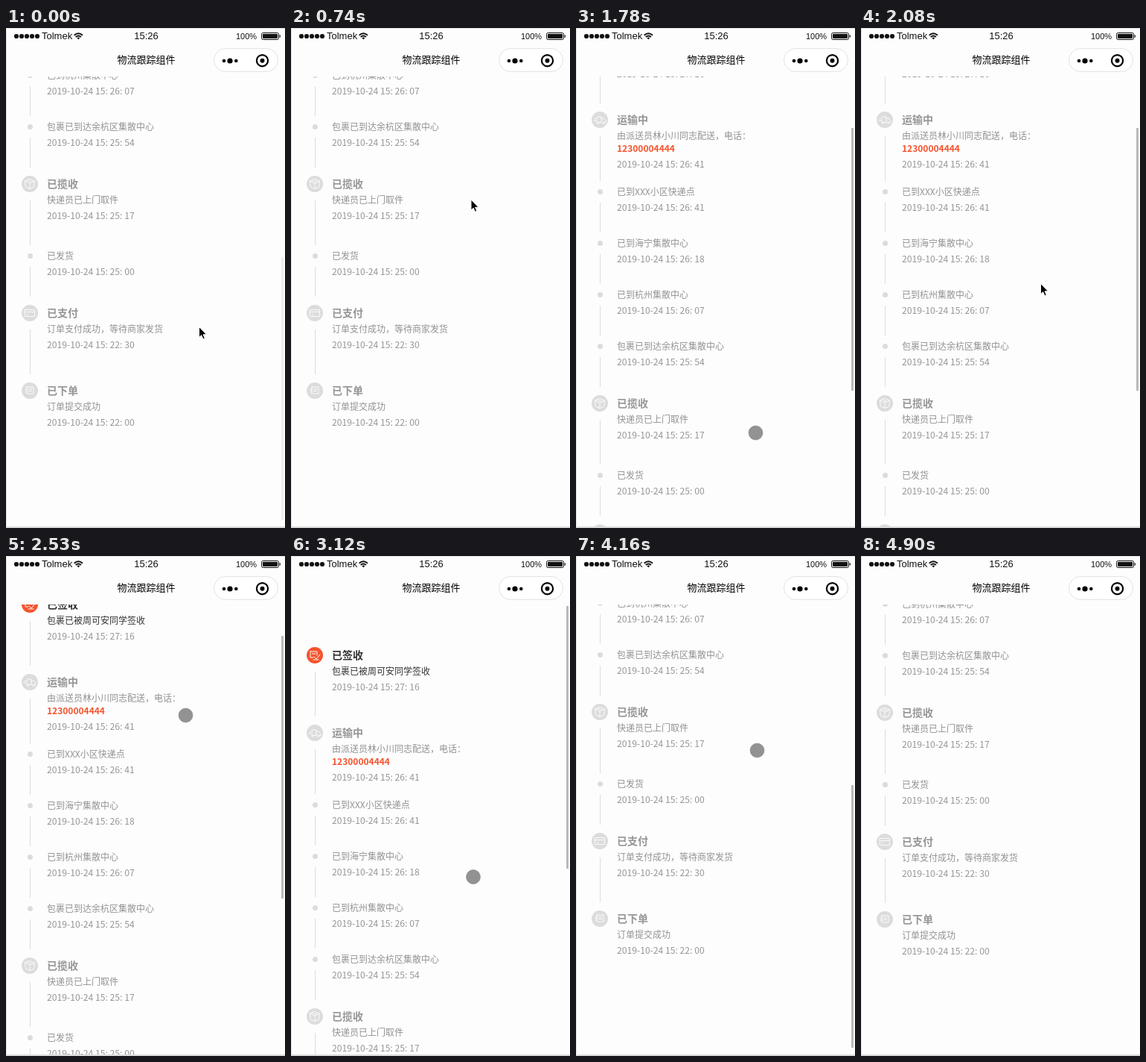
An HTML page for the animation above (5.5 s loop, 375 by 670 pixels).

```html
<!DOCTYPE html>
<html lang="zh-CN">
<head>
<meta charset="utf-8">
<style>
  html, body { margin: 0; width: 100%; height: 100%; overflow: hidden; background: #fdfdfd; }
  svg { display: block; width: 375px; height: 670px; }
  text { font: 12px "Noto Sans CJK SC", "Noto Sans CJK", sans-serif; fill: #929292; white-space: pre; }
  .time { font-size: 12.15px; fill: #969696; }
  .title { font-size: 14px; font-weight: 700; fill: #969696; }
  .done { fill: #333; }
  .phone { font-weight: 700; fill: #f5532d; }
  .status { font: 13px "Liberation Sans", Arial, sans-serif; fill: #111; }
  .small { font-size: 11px; }
  .head { font-size: 13px; font-weight: 500; fill: #000; }
  .icon { fill: none; stroke: #fbfbfb; stroke-width: 1; stroke-linejoin: round; stroke-linecap: round; }
</style>
</head>
<body>
<svg viewBox="0 0 375 670">
  <defs><clipPath id="page"><rect y="65" width="375" height="603"/></clipPath></defs>
  <rect width="375" height="670" fill="#fdfdfd"/>
  <g clip-path="url(#page)"><g id="list"></g></g>

  <g id="dots" fill="#111"></g>
  <text class="status" x="48" y="15">Tolmek</text>
  <g fill="none" stroke="#111" stroke-width="1.8">
    <path d="M91.6 9.8Q97.3 4.800 103 9.800M93.700 12Q97.300 8.900 100.900 12"/>
    <path d="M95.300 13.200Q97.300 11.700 99.300 13.200L97.300 15.500Z" fill="#111" stroke="none"/>
  </g>
  <text class="status" x="188.5" y="15" text-anchor="middle">15:26</text>
  <text class="status small" x="309" y="15">100%</text>
  <rect x="343.500" y="6.500" width="23" height="9" rx="2" fill="none" stroke="#111"/>
  <rect x="345" y="8" width="20" height="6" rx=".8" fill="#111"/>
  <path d="M368 9.300Q369.500 11 368 12.700Z" fill="#111" stroke="#111" stroke-width=".6"/>

  <text class="head" x="188.500" y="47" text-anchor="middle">物流跟踪组件</text>
  <rect x="279.500" y="27.500" width="86" height="31" rx="15.500" fill="#fff" stroke="#e3e3e3"/>
  <circle cx="293" cy="44" r="2.300"/><circle cx="301" cy="44" r="3.600"/><circle cx="309.300" cy="44" r="2.300"/>
  <circle cx="344.500" cy="43.700" r="7.600" fill="none" stroke="#000" stroke-width="2.200"/>
  <circle cx="344.500" cy="43.700" r="3"/>

  <path d="M.5 670V.5H375" fill="none" stroke="#e2e2e2"/>
  <path d="M0 669H375" stroke="#d8d8d8" stroke-width="2"/>
  <rect id="bar" x="370" width="3" height="352"/>
  <circle id="touch" r="9.500" fill="#929292" stroke="#878787" stroke-width=".6"/>
  <path id="arrow" d="M0 0V14.200L3.200 11.200L5.400 16.300L7.800 15.300L5.600 10.300H10Z" fill="#000" stroke="#fff" stroke-width="1"/>
</svg>
<script>
const LOOP = 5500, STEP = 148.5, LAST = 33;
const $ = id => document.getElementById(id);

const icons = {
  order: 'M-4 -5H5V4H-2.500Q-5 4 -5 1.500V-3M-4 -5V2.500M-1.500 -2H2.500M-1.500 .5H2.500',
  card: 'M-6.500 -4.500H6.500V4.500H-6.500ZM-6.500 -1.500H6.500M-4 2H-2',
  box: 'M0 -6.500L6.500 -3.800L5.700 4L0 6.500L-5.700 4L-6.500 -3.800ZM-6.500 -3.800L0 -1L6.500 -3.800M0 -1V6.500M-3.300 -5.100L3.300 -2.300',
  truck: 'M-4 -4H2V3.500H-2M-7 -1.500H-3M-8 1H-4M2 -2H5L8 1V3.500H6M-4 2V3.500M-3.800 4.200A1.300 1.300 0 1 0 -1.200 4.200A1.300 1.300 0 1 0 -3.800 4.200M3.300 4.200A1.300 1.300 0 1 0 5.900 4.200A1.300 1.300 0 1 0 3.300 4.200',
  signed: 'M-6 -5H3V0M-6 -5V3H-2M-3.500 -2H1M-1 2L2 5L7 -1M-2 6H5'
};

// Vertical centres are given for the list scrolled to its end.
const items = [
  { y: -275, icon: 'signed', title: '已签收', text: '包裹已被周可安同学签收', time: '27: 16', done: true },
  { y: -171, icon: 'truck', title: '运输中', text: '由派送员林小川同志配送，电话：', phone: '12300004444', time: '26: 41' },
  { y: -74.5, text: '已到XXX小区快递点', time: '26: 41' },
  { y: -5.5, text: '已到海宁集散中心', time: '26: 18' },
  { y: 63.5, text: '已到杭州集散中心', time: '26: 07' },
  { y: 132.5, text: '包裹已到达余杭区集散中心', time: '25: 54' },
  { y: 209, icon: 'box', title: '已揽收', text: '快递员已上门取件', time: '25: 17' },
  { y: 305.5, text: '已发货', time: '25: 00' },
  { y: 382, icon: 'card', title: '已支付', text: '订单支付成功，等待商家发货', time: '22: 30' },
  { y: 486, icon: 'order', title: '已下单', text: '订单提交成功', time: '22: 00', last: true }
];

const label = (y, text, cls = '') => `<text x="55" y="${y}" class="${cls}">${text}</text>`;
const line = (from, to) => `<path d="M32.5 ${from}V${to}" stroke="#dcdcdc"/>`;
const stamp = (y, time) => label(y, '2019-10-24 15: ' + time, 'time');

function itemMarkup(it) {
  if (!it.icon) {
    return `<g transform="translate(0 ${it.y})"><circle cx="32.500" r="3.500" fill="#dcdcdc"/>` +
      line(14.5, 54.5) + label(4.8, it.text) + stamp(25.8, it.time) + '</g>';
  }
  const done = it.done ? 'done' : '';
  return `<g transform="translate(0 ${it.y})">` +
    `<circle cx="32" r="11" fill="${it.done ? '#f5532d' : '#dcdcdc'}"/>` +
    `<path class="icon" transform="translate(32 0)" d="${icons[it.icon]}"/>` +
    (it.last ? '' : line(22, 82)) +
    label(5.2, it.title, 'title ' + done) + label(26.3, it.text, done) +
    (it.phone ? label(42.8, it.phone, 'phone') : '') +
    stamp(it.phone ? 64.3 : 47.3, it.time) + '</g>';
}

$('list').innerHTML = items.map(itemMarkup).join('');
$('dots').innerHTML = [0, 1, 2, 3, 4].map(i => `<circle cx="${14 + i * 7}" cy="11" r="3.100"/>`).join('');

// step, pointer x, pointer y, pressed, scroll distance from the end
const track = [
  [0, 259.5, 400.5, 0, 0], [5, 242, 230, 0, 0], [8, 242, 249, 0, 0],
  [9, 242, 377.5, 1, 110], [11, 242, 515, 1, 258], [12, 241.5, 542.5, 1, 294],
  [13, 242, 500, 0, 294], [15, 241, 185, 0, 294],
  [16, 241, 170, 1, 296], [17, 241.5, 213.5, 1, 340], [18, 241, 275, 1, 401], [19, 241, 300, 1, 408],
  [20, 243, 400, 0, 408], [21, 245, 430, 1, 408], [23, 245.5, 152.5, 1, 129],
  [24, 245, 190, 0, 129], [25, 244, 370, 0, 129],
  [26, 244, 388, 1, 127], [28, 243.5, 260.5, 1, 0], [29, 244, 240, 1, 0],
  [30, 250, 300, 0, 0], [31, 260, 400, 0, 1], [33, 260, 400, 0, 1]
];

function pose(n) {
  const i = Math.max(0, track.findLastIndex(k => k[0] <= n));
  const a = track[i], b = track[i + 1] || a;
  const f = a === b ? 0 : (n - a[0]) / (b[0] - a[0]);
  const mix = j => a[j] + (b[j] - a[j]) * f;
  return { x: mix(1), y: mix(2), pressed: a[3], scroll: Math.round(mix(4)) };
}

function barColor(n) {
  if (n === 0 || n === 32) return '#ededed';
  return n >= 9 && n < 32 ? '#b9b9b9' : 'none';
}

function render(t) {
  const n = Math.min(LAST, Math.floor((t + 7) / STEP));
  const p = pose(n), place = `translate(${p.x} ${p.y})`;
  $('list').setAttribute('transform', `translate(0 ${p.scroll})`);
  $('bar').setAttribute('y', Math.round(307 - p.scroll * 0.588));
  $('bar').setAttribute('fill', barColor(n));
  $('touch').setAttribute('transform', place);
  $('arrow').setAttribute('transform', place);
  $('touch').style.display = p.pressed ? '' : 'none';
  $('arrow').style.display = p.pressed || n === LAST ? 'none' : '';
}

const start = performance.now();
function tick() {
  render((performance.now() - start) % LOOP);
  requestAnimationFrame(tick);
}
tick();
</script>
</body>
</html>
```
